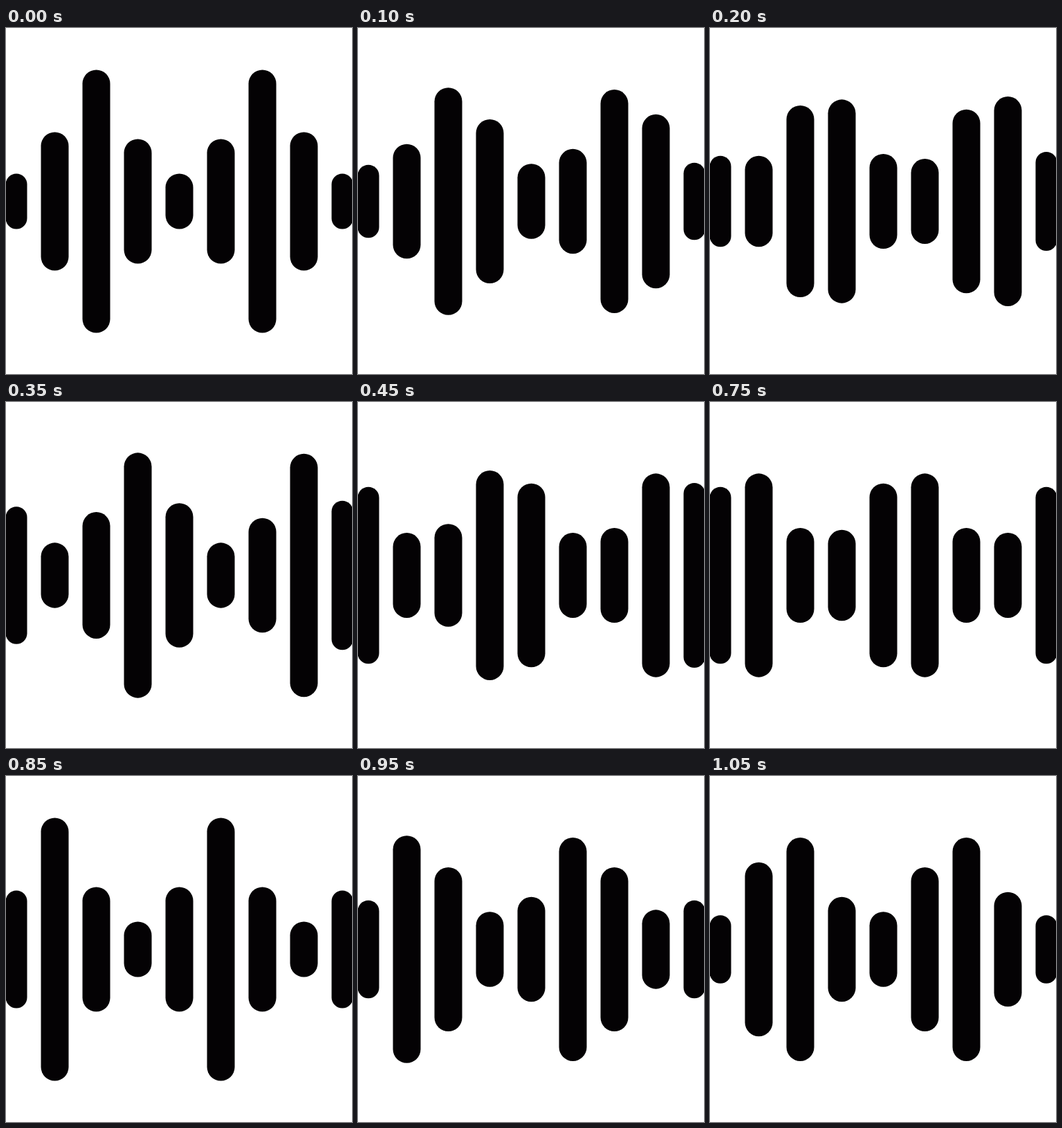
These frames come from a looping animation (500x500 px, 1.1 s). An HTML page:

```html
<!DOCTYPE html>
<html lang="en">
<head>
<meta charset="utf-8">
<title>Sound wave</title>
<style>
  html, body { margin: 0; width: 100%; height: 100%; overflow: hidden; background: #fff; }
  svg { display: block; width: 100%; height: 100%; }
</style>
</head>
<body>
<svg id="stage" viewBox="0 0 500 500" fill="#040204"></svg>
<script>
const TICK = 50, STEPS = 7, BARS = 9, MID = 250.5;
const isEdge = i => i === 0 || i === BARS - 1;

// The wave repeats every four bars and moves one bar to the right per pose.
function barHeight(i, pose) {
  const shift = pose % 4;
  const crest = (i - shift + 6) % 4;
  const shoulder = shift < 3 && (i === 1 + shift || i === 7 + shift);
  const height = crest === 0 ? 380 : crest === 2 ? 80 : shoulder ? 200 : 180;
  return isEdge(i) && pose > 0 ? height - 10 : height;
}

const stage = document.getElementById("stage");
const bars = Array.from({ length: BARS }, (_, i) => {
  const width = isEdge(i) ? 31 : 40;
  const bar = document.createElementNS("http://www.w3.org/2000/svg", "rect");
  bar.setAttribute("x", i ? 60 * i - 9.5 : -0.5);
  bar.setAttribute("width", width);
  bar.setAttribute("rx", width / 2);
  stage.append(bar);
  return bar;
});

// The first two moves take six ticks, the last two take five.
const moveTicks = pose => pose < 2 ? 6 : 5;

function draw(ms) {
  let tick = Math.floor(ms / TICK) % 22;
  let pose = 0;
  while (tick >= moveTicks(pose)) tick -= moveTicks(pose++);

  // Each move has seven equal steps, some of which are skipped.
  const part = Math.floor(tick * STEPS / moveTicks(pose)) / STEPS;
  bars.forEach((bar, i) => {
    const from = barHeight(i, pose);
    const height = from + (barHeight(i, pose + 1) - from) * part;
    bar.setAttribute("y", MID - height / 2);
    bar.setAttribute("height", height);
  });
}

const start = performance.now();
function loop() {
  draw(performance.now() - start);
  requestAnimationFrame(loop);
}
loop();
</script>
</body>
</html>
```
